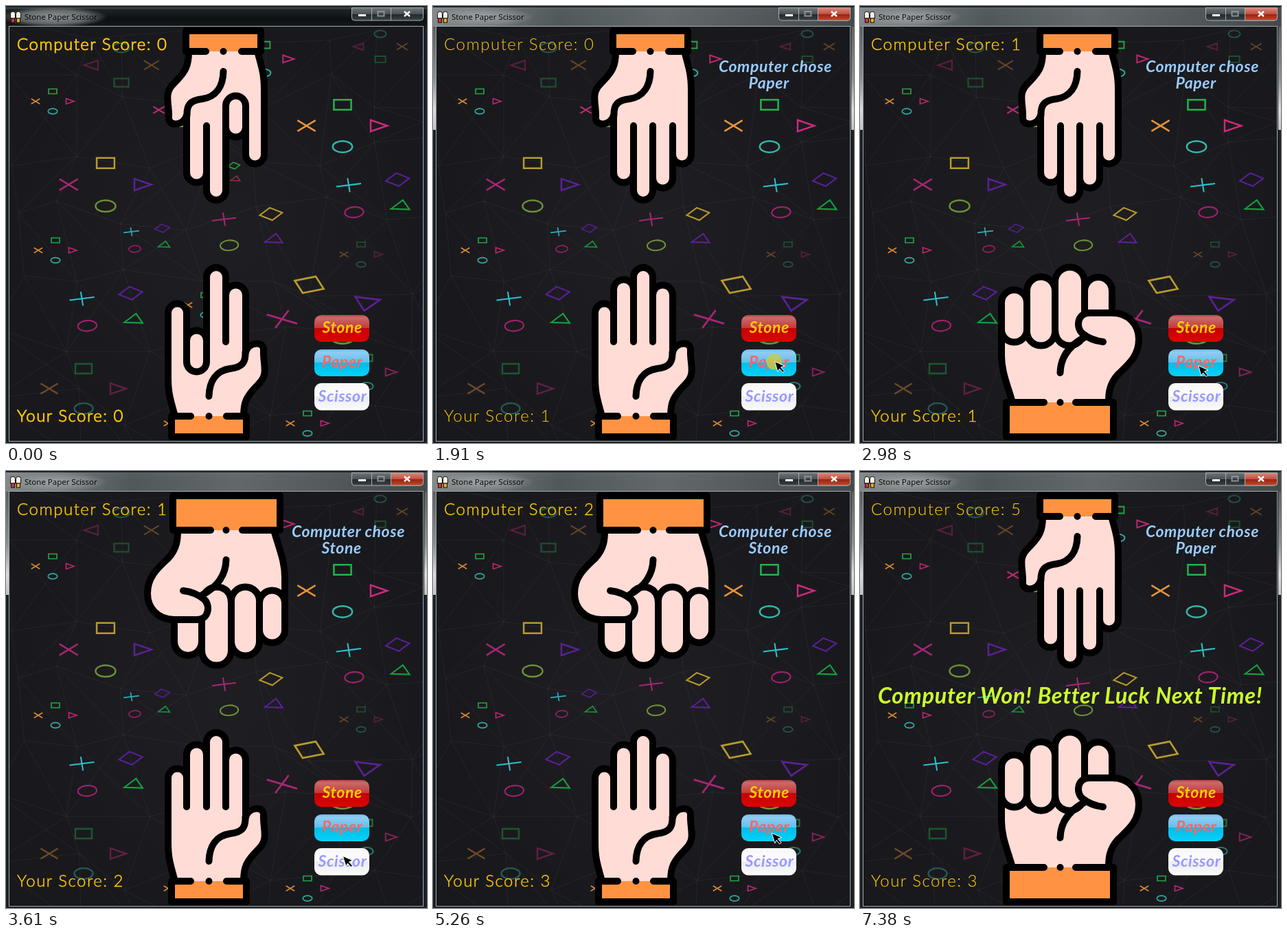
These frames come from a looping animation (613x635 px, 8.01 s). An HTML page:

```html
<!DOCTYPE html>
<html lang="en">
<head>
<meta charset="utf-8">
<title>Stone Paper Scissor</title>
<style>
html, body { margin: 0; width: 100%; height: 100%; overflow: hidden; background: #1a2023; }
svg { display: block; width: 613px; height: 635px; }
text { white-space: pre; }
.title { font: 11.5px "Open Sans", "Noto Sans", sans-serif; }
.score { font: 300 24px Lato, sans-serif; letter-spacing: 1.5px; fill: #ffcb05; stroke: #ffcb05; stroke-linejoin: round; }
.label { font: italic 700 23px Lato, sans-serif; letter-spacing: .6px; }
.banner { font: italic 700 32.5px Lato, sans-serif; letter-spacing: .7px; fill: #cdff2e; }
.hand { fill: #ffdcd5; stroke: #000; stroke-width: 10; stroke-linecap: round; stroke-linejoin: round; }
.line { fill: none; }
.sign path, .sign circle { fill: none; vector-effect: non-scaling-stroke; }
</style>
</head>
<body>
<svg viewBox="0 0 613 635">
  <defs>
    <linearGradient id="bar" x2="0" y2="1">
      <stop offset="0" stop-color="#4a5052"/><stop offset=".12" stop-color="#1d2325"/>
      <stop offset=".6" stop-color="#0c1011"/><stop offset="1" stop-color="#15191b"/>
    </linearGradient>
    <linearGradient id="glass">
      <stop offset="0" stop-color="#959c9f"/><stop offset=".3" stop-color="#5c6467"/>
      <stop offset=".55" stop-color="#70777a"/><stop offset="1" stop-color="#4c5356"/>
    </linearGradient>
    <linearGradient id="side" x2="0" y2="1">
      <stop offset="0" stop-color="#5a6063"/><stop offset=".5" stop-color="#8a8f91"/>
      <stop offset=".8" stop-color="#d8dadb"/><stop offset="1" stop-color="#c0c3c5"/>
    </linearGradient>
    <linearGradient id="grey" x2="0" y2="1">
      <stop offset="0" stop-color="#70777b"/><stop offset=".5" stop-color="#4a5155"/>
      <stop offset=".5" stop-color="#22282b"/><stop offset="1" stop-color="#3b4246"/>
    </linearGradient>
    <linearGradient id="close" x2="0" y2="1">
      <stop offset="0" stop-color="#d98a7c"/><stop offset=".5" stop-color="#bf5040"/>
      <stop offset=".5" stop-color="#96210f"/><stop offset="1" stop-color="#c04a2c"/>
    </linearGradient>
    <linearGradient id="red" x2="0" y2="1">
      <stop offset="0" stop-color="#b84444"/><stop offset=".1" stop-color="#cb6a6a"/>
      <stop offset=".48" stop-color="#c23a3a"/><stop offset=".5" stop-color="#c60000"/>
      <stop offset="1" stop-color="#dd0505"/>
    </linearGradient>
    <linearGradient id="blue" x2="0" y2="1">
      <stop offset="0" stop-color="#6cb6e4"/><stop offset=".1" stop-color="#8fcdf4"/>
      <stop offset=".48" stop-color="#62c0ea"/><stop offset=".5" stop-color="#00bde6"/>
      <stop offset="1" stop-color="#06d2fb"/>
    </linearGradient>
    <linearGradient id="white" x2="0" y2="1">
      <stop offset="0" stop-color="#f6f6f8"/><stop offset=".48" stop-color="#fff"/>
      <stop offset=".5" stop-color="#ececee"/><stop offset="1" stop-color="#fbfbfb"/>
    </linearGradient>
    <radialGradient id="glow">
      <stop offset="0" stop-color="#a9adae" stop-opacity=".85"/>
      <stop offset=".65" stop-color="#8d9293" stop-opacity=".65"/>
      <stop offset="1" stop-color="#8d9293" stop-opacity="0"/>
    </radialGradient>
    <radialGradient id="floor">
      <stop offset="0" stop-color="#1f1e23"/><stop offset="1" stop-color="#19191d"/>
    </radialGradient>
    <clipPath id="client"><rect x="5" y="30" width="602" height="602"/></clipPath>

    <g id="smallCuff">
      <path d="M241 596H350V626H241Z" fill="#ff9343" stroke="none"/>
      <path class="line" d="M269 596H241V626H350V596H321M295.500 596h.01"/>
    </g>
    <g id="palmCrease"><path class="line" d="M295.500 567C296 545 306 530 326 527C344 525 349 518 348.500 503"/></g>

    <g id="Rest">
      <path d="M246 596C238 568 236 560 236 540V446A13.500 13.500 0 0 1 263 446V486A14.500 14.500 0 0 1 292 486V394A14 14 0 0 1 320 394V420A14.500 14.500 0 0 1 349 420V503C354 487 376 487 375 500C374 520 383 535 368 549C350 567 346 575 346 596"/>
      <path class="line" d="M263 486V517A14.500 14.500 0 0 0 292 517V486M320 488V420"/>
      <use href="#palmCrease"/><use href="#smallCuff"/>
    </g>
    <g id="Paper">
      <path d="M246 596C238 568 236 560 236 540V446A13.500 13.500 0 0 1 263 446V412A14.500 14.500 0 0 1 292 412V394A14 14 0 0 1 320 394V420A14.500 14.500 0 0 1 349 420V503C354 487 376 487 375 500C374 520 383 535 368 549C350 567 346 575 346 596"/>
      <path class="line" d="M263 488V446M292 488V412M320 488V420"/>
      <use href="#palmCrease"/><use href="#smallCuff"/>
    </g>
    <g id="Stone">
      <path d="M222 576C213 546 206 530 206 508V431A18.500 18.500 0 0 1 243 431V414A20.500 20.500 0 0 1 284 414V401A21.500 21.500 0 0 1 327 401V414A20 20 0 0 1 367 414V446C392 446 406 464 406 484C406 508 392 520 376 535C362 550 362 565 362 576"/>
      <path class="line" d="M206 470A18.500 18.500 0 0 0 243 470V431M243 473A20.500 20.500 0 0 0 284 473V414M284 470C284 494 308 500 321 486M327 401V446"/>
      <path class="line" d="M367 446H334C316 446 314 468 324 476C334 484 345 487 354 488M291.500 533C292 510 304 494 326 482"/>
      <path d="M213 576H369V626H213Z" fill="#ff9343" stroke="none"/>
      <path class="line" d="M268 576H213V626H369V576H314M291.500 576h.01"/>
    </g>
    <g id="Scissor">
      <g transform="rotate(180 306 331)">
        <path d="M267 66C267 95 236 105 236 128C236 145 250 158 259 162L248 236C246 256 275 259 278 240L291 178L302 270C305 287 331 285 329 266L323 182C326 196 350 194 350 176C354 184 376 184 376 168V125C376 105 367 95 367 66"/>
        <path class="line" d="M323 182L320 140C319 122 348 120 348 140L350 178M349 144C352 130 373 130 376 146"/>
        <path class="line" d="M316.500 96C317 118 302 126 287 131M268 128C290 130 302 138 300 149C298 160 280 157 259 162"/>
      </g>
      <use href="#smallCuff"/>
    </g>
  </defs>

  <rect width="613" height="635" fill="#1a2023"/>
  <rect y="2" width="613" height="28" fill="url(#bar)"/>
  <g id="active">
    <rect y="2" width="613" height="28" fill="url(#glass)" fill-opacity=".85"/>
    <g fill="url(#side)"><rect y="30" width="4" height="150"/><rect x="609" y="30" width="4" height="150"/></g>
  </g>
  <ellipse cx="70" cy="16" rx="78" ry="15" fill="url(#glow)"/>
  <g stroke="#111" stroke-width="1">
    <path d="M6.500 18V11.500a3.500 3.500 0 0 1 7 0V18Z" fill="#fff1e6"/><path d="M14.500 18V11.500a3.500 3.500 0 0 1 7 0V18Z" fill="#fff1e6"/>
    <rect x="7.500" y="18" width="5" height="6" fill="#d8342e"/><rect x="15.500" y="18" width="5" height="6" fill="#f0b020"/>
  </g>
  <text class="title" x="27" y="20">Stone Paper Scissor</text>
  <g stroke="#a9b0b3" stroke-width="1">
    <path d="M503.500 2.500H607.500V17a4 4 0 0 1-4 4H507.500a4 4 0 0 1-4-4Z" fill="url(#grey)"/>
    <path id="closeBox" d="M560.500 2.500H607.500V17a4 4 0 0 1-4 4H560.500Z" fill="url(#close)"/>
    <path d="M532.500 3V21M560.500 3V21"/>
  </g>
  <rect x="513" y="12" width="11" height="3" fill="#fff"/>
  <rect x="541.500" y="8" width="9" height="6.500" fill="none" stroke="#8b9194" stroke-width="2"/>
  <path d="M580 8l8 7m0-7l-8 7" stroke="#fff" stroke-width="2.400"/>
  <rect x="4.500" y="29.500" width="603" height="603" fill="none" stroke="#a4aaac"/>

  <g clip-path="url(#client)">
    <rect x="5" y="30" width="602" height="602" fill="url(#floor)"/>
    <path id="mesh" fill="none" stroke="#c8c8dc" stroke-opacity=".06"/>
    <g id="signs"></g>
    <g class="hand">
      <use id="compHand" transform="rotate(180 306 331)"/>
      <use id="yourHand"/>
    </g>
  </g>
  <text class="score" id="compScore" x="16" y="63.500"></text>
  <text class="score" id="yourScore" x="16" y="603.500"></text>
  <g class="label" id="chose" fill="#99ccff">
    <text x="416" y="96">Computer chose</text><text id="pick" x="459.500" y="120"></text>
  </g>
  <g class="label">
    <rect x="449" y="449" width="80" height="39" rx="10" fill="url(#red)"/>
    <text x="460.500" y="475" fill="#ffcc00">Stone</text>
    <rect x="449" y="499" width="80" height="39" rx="10" fill="url(#blue)"/>
    <text x="460" y="525" fill="#ff6666">Paper</text>
    <rect x="449" y="548" width="80" height="39.500" rx="10" fill="url(#white)"/>
    <text x="454.500" y="575" fill="#9999ff">Scissor</text>
  </g>
  <text class="banner" id="banner" x="26" y="338">Computer Won! Better Luck Next Time!</text>
  <g id="cursor">
    <circle id="ring" r="11.500" cy="1" fill="#c8d23c" fill-opacity=".75"/>
    <path d="M.5 .5L15 7L9.500 9L14.500 14.500L12 16.500L7.500 11L5 15.500Z" fill="#000" stroke="#fff" stroke-width="1"/>
  </g>
</svg>
<script>
const LOOP = 8010, ACTIVE = 210, STEP = 76.4;
const $ = id => document.getElementById(id);

// time, computer's hand, player's hand, computer score, player score
const rounds = [
  [0, 'Rest', 'Rest', 0, 0],
  [520, 'Stone', 'Stone', 0, 0],
  [1450, 'Stone', 'Paper', 0, 1],
  [1910, 'Paper', 'Paper', 0, 1],
  [2700, 'Paper', 'Stone', 1, 1],
  [3300, 'Stone', 'Paper', 1, 2],
  [3760, 'Scissor', 'Scissor', 1, 2],
  [4140, 'Paper', 'Paper', 1, 2],
  [4680, 'Paper', 'Stone', 2, 2],
  [4990, 'Stone', 'Paper', 2, 3],
  [5450, 'Stone', 'Scissor', 3, 3],
  [6080, 'Scissor', 'Paper', 4, 3],
  [6540, 'Paper', 'Stone', 5, 3]
];

// time, x, y of the pointer's tip
const track = [
  [210, 600, 420], [440, 494, 472], [980, 494, 472], [1275, 497, 516],
  [2290, 497, 516], [2660, 494, 478], [2780, 494, 478], [2955, 492, 522],
  [3350, 492, 522], [3560, 490, 559], [3840, 490, 559], [4060, 491, 520],
  [4330, 491, 520], [4480, 494, 477], [4750, 494, 477], [4920, 493, 520],
  [5230, 493, 520], [5400, 491, 562], [5650, 491, 562], [5880, 491, 525],
  [6150, 491, 525], [6400, 494, 478], [6600, 494, 478], [6800, 488, 520],
  [6860, 487, 518], [7080, 487, 518], [7310, -20, 366]
];

// colours of square, cross, triangle, circle
const neon = ['#25b24b', '#e8943a', '#cc2a7c', '#35b8a8'];
const dusk = ['#b89a2a', '#a62672', '#5b2194', '#6b9036'];
const jade = ['#5a1f98', '#2cc0c8', '#15a03e', '#a3206f'];
// axes of one group of signs at scale 1
const flat = [25, 0, 0, 14.5], tilt = [25, 10, -20, 15], lean = [26.5, -5.2, 10, 15.6];

const groups = [
  [68, 138.5, 1, flat, neon, .9], [72, 355, 1, flat, neon, .9],
  [439, 606.5, 1, flat, neon, .9], [290, 434.5, 1, flat, neon, .9],
  [261, 606.5, 1, flat, neon, .9], [490, 174, 2.1, flat, neon, 1],
  [376, 77, 1.4, flat, neon, .9], [255, 151, 1.3, flat, ['#6b9036', '#d0307c', '#5b2194', '#a8c83c'], .9],
  [145, 259.5, 2.15, flat, dusk, 1], [517, 361, 1, flat, neon, .35],
  [525, 532, 1.42, flat, neon, .6], [113, 556, 2, flat, neon, .4],
  [168, 86, -1.75, flat, neon, .35], [545, 59, -1.27, flat, neon, .35],
  [207.5, 338, 1, tilt, jade, .9], [150, 441, 1.58, tilt, jade, 1],
  [538.5, 276, 1.58, tilt, jade, 1], [355.5, 325, 1.52, tilt, dusk, 1],
  [316, 244, .8, tilt, ['#25b24b', '#a62672', '#b32a4c', '#6b9036'], .9],
  [465.5, 442.5, 2.4, lean, dusk, 1]
];

$('signs').innerHTML = groups.map(([x, y, s, axes, c, alpha]) => {
  const m = [...axes.map(v => v * s), x, y].join(' ');
  const w = .9 + .75 * Math.abs(s);
  return `<g class="sign" transform="matrix(${m})" opacity="${alpha}" stroke-width="${w}">
    <path d="M-.24-1.24H.24V-.76H-.24Z" stroke="${c[0]}"/>
    <path d="M-1.25-.26L-.75 .26M-.75-.26L-1.25 .26" stroke="${c[1]}"/>
    <path d="M.78-.27L1.24 0L.78 .27Z" stroke="${c[2]}"/>
    <circle cy="1" r=".27" stroke="${c[3]}"/></g>`;
}).join('');

function drawMesh() {
  let seed = 17;
  const rand = () => (seed = seed * 16807 % 2147483647) / 2147483647;
  const nodes = [];
  for (let r = 0; r < 8; r++) {
    nodes.push([]);
    for (let c = 0; c < 8; c++)
      nodes[r].push([c * 92 - 20 + rand() * 60, r * 92 + rand() * 60]);
  }
  let d = '';
  const link = (a, b) => { if (b) d += `M${a}L${b}`; };
  nodes.forEach((row, r) => row.forEach((p, c) => {
    const below = nodes[r + 1] || [];
    link(p, row[c + 1]);
    link(p, below[c]);
    link(p, below[rand() < .5 ? c + 1 : c - 1]);
  }));
  $('mesh').setAttribute('d', d);
}

function pointerAt(t) {
  const i = track.findIndex(p => p[0] > t);
  if (i < 0) return track[track.length - 1].slice(1);
  const [t0, x0, y0] = track[Math.max(0, i - 1)], [t1, x1, y1] = track[i];
  const k = t1 > t0 ? Math.max(0, (t - t0) / (t1 - t0)) : 0;
  return [x0 + (x1 - x0) * k, y0 + (y1 - y0) * k];
}

const show = (id, on) => $(id).setAttribute('visibility', on ? 'visible' : 'hidden');

function render(t) {
  const n = rounds.filter(r => r[0] <= t).length - 1;
  const [since, comp, you, compScore, yourScore] = rounds[n];
  const over = n === rounds.length - 1;
  $('compHand').setAttribute('href', '#' + comp);
  $('yourHand').setAttribute('href', '#' + you);
  $('compScore').textContent = 'Computer Score: ' + compScore;
  $('yourScore').textContent = 'Your Score: ' + yourScore;
  $('pick').textContent = comp;

  // score text thickens while it is drawn over itself
  const bold = over ? .1 : n ? Math.min(1, (t - since) / 600) * .9 : .9;
  $('compScore').style.strokeWidth = $('yourScore').style.strokeWidth = bold + 'px';

  show('chose', n > 0);
  show('banner', over);
  show('active', t >= ACTIVE);
  show('closeBox', t >= ACTIVE);

  const tick = ACTIVE + Math.floor((t - ACTIVE) / STEP) * STEP;
  const [x, y] = pointerAt(tick);
  $('cursor').setAttribute('transform', `translate(${x.toFixed(1)} ${y.toFixed(1)})`);
  $('cursor').style.display = t >= ACTIVE && x > -18 ? '' : 'none';
  show('ring', n > 0 && t - since < 80);
}

drawMesh();
const start = performance.now();
function loop() {
  render((performance.now() - start) % LOOP);
  requestAnimationFrame(loop);
}
loop();
</script>
</body>
</html>
```
